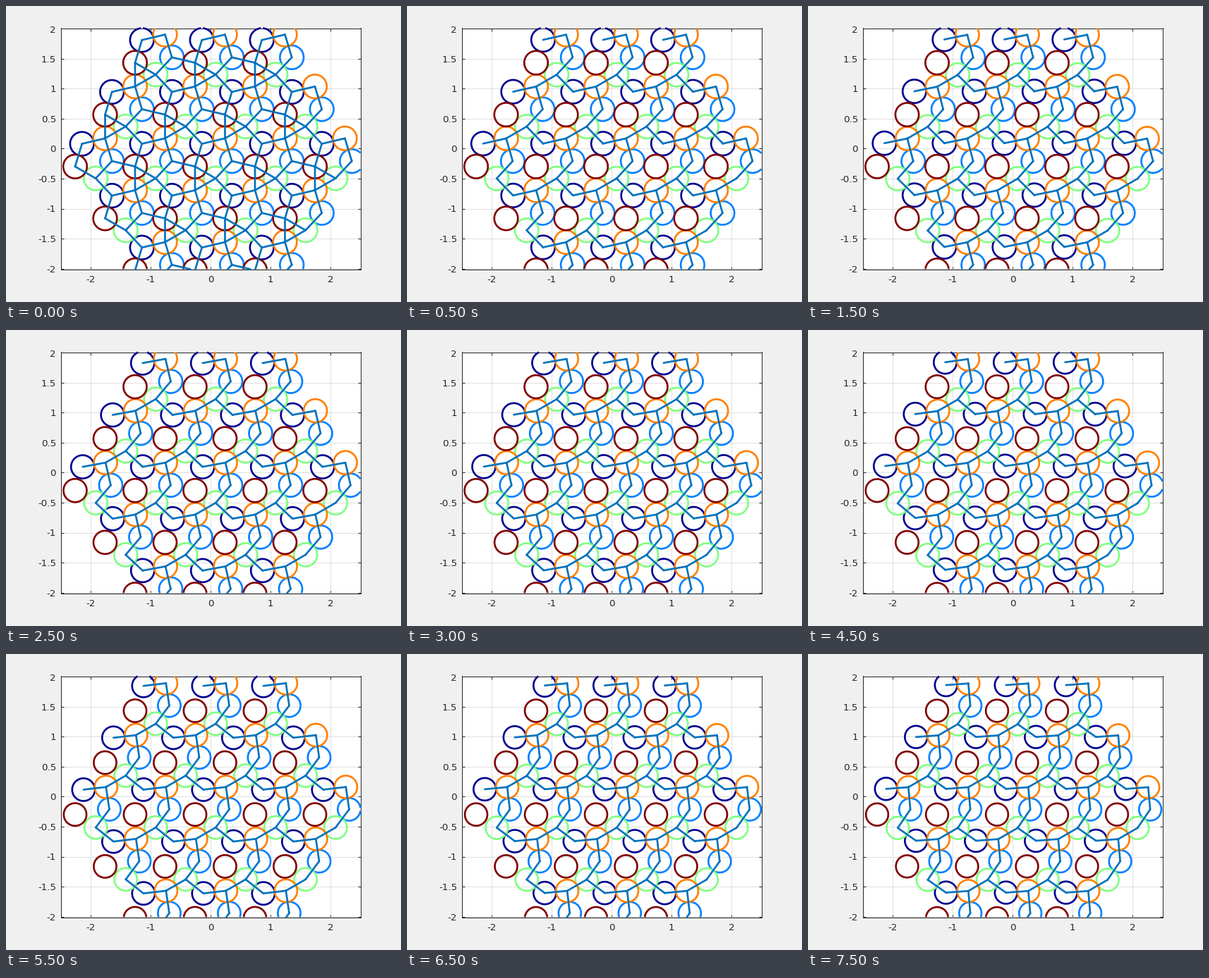
A matplotlib script for the animation above (8000 ms loop, 560x420 px).

```python
import numpy as np
import matplotlib.pyplot as plt
from matplotlib.animation import FuncAnimation

W, H, DPI = 560, 420, 100
PX = 72 / DPI            # one pixel in points
SCALE = 85               # pixels per data unit
LEFT, TOP, BOX_W, BOX_H = 77.5, 31.5, 425, 342
XMAX, YMAX = BOX_W / SCALE / 2, BOX_H / SCALE / 2
FRAMES, INTERVAL = 16, 500
LINE_W = 2.67 * PX
INK = "#262626"

A1 = np.array([1, 0])
A2 = np.array([0.5, np.sqrt(3) / 2])
RED = np.array([-0.259, -0.297])     # the disk that stays put

# 19 cells in a hexagon, row by row
CELLS = [i * A1 + j * A2 for j in range(-2, 3) for i in range(-2, 3) if abs(i + j) <= 2]

NAVY, SKY, GREEN, ORANGE, MAROON = range(5)
COLORS = ["#00008f", "#0080ff", "#80ff80", "#ff8000", "#800000"]

# (disk, disk, lattice shift of the second one)
BONDS = [
    (NAVY, ORANGE, 0 * A1), (ORANGE, SKY, 0 * A1), (SKY, GREEN, 0 * A1),
    (GREEN, NAVY, A1 - A2), (GREEN, ORANGE, -A2),
]
RED_BONDS = [
    (GREEN, MAROON, 0 * A1), (MAROON, NAVY, 0 * A1),
    (SKY, MAROON, A1), (MAROON, ORANGE, -A2),
]


def polar(r, deg):
    a = np.radians(deg)
    return r * np.array([np.cos(a), np.sin(a)])


def basis(near, alpha, far, beta):
    """Disk centres, mirror-symmetric about the -60 degree axis through RED."""
    return RED + np.array([
        polar(far, 120 - beta),
        polar(far, 120 + beta) + A1,
        polar(near, -60 + alpha),
        polar(near, -60 - alpha) + A2,
        (0, 0),
    ])


START, END = basis(0.3961, 30, 0.3961, 46.8), basis(0.411, 27, 0.4534, 49.25)
D_START, D_END = 0.3961, 0.373

TURN = np.linspace(0, 2 * np.pi, 241)
UNIT = np.column_stack([np.cos(TURN), np.sin(TURN)])
STEPS = np.linspace(0, 1, 80)[:, None]
GAP = np.full((1, 2), np.nan)


def join(paths):
    """Merge paths into one broken line, cut at the axes limits."""
    pts = np.vstack([part for path in paths for part in (path, GAP)])
    outside = (np.abs(pts[:, 0]) > XMAX) | (np.abs(pts[:, 1]) > YMAX)
    pts[outside] = np.nan
    return pts.T


fig = plt.figure(figsize=(W / DPI, H / DPI), dpi=DPI, facecolor="#f0f0f0")
ax = fig.add_axes([LEFT / W, 1 - (TOP + BOX_H) / H, BOX_W / W, BOX_H / H])
ax.set(xlim=(-XMAX, XMAX), ylim=(-YMAX, YMAX),
       xticks=np.arange(-2, 3), yticks=np.arange(-2, 2.1, 0.5))
ax.set_axisbelow(True)
ax.grid(color="#dfdfdf", lw=PX)
ax.tick_params(direction="in", top=True, right=True, length=4.3 * PX, width=PX,
               color=INK, labelcolor=INK, labelsize=13.33 * PX,
               labelfontfamily="DejaVu Sans")
ax.tick_params(axis="x", pad=8.4 * PX)
ax.tick_params(axis="y", pad=6.5 * PX)
for axis in (ax.xaxis, ax.yaxis):
    axis.set_major_formatter(lambda v, pos: f"{v:g}")
for spine in ax.spines.values():
    spine.set(color=INK, linewidth=PX, zorder=1.5)


def stroke(color, z, cap):
    return ax.plot([], [], color=color, lw=LINE_W, zorder=z, clip_on=False,
                   solid_capstyle=cap, solid_joinstyle="round")[0]


rings = [stroke(c, 3, "butt") for c in COLORS]
net = stroke("#0072bd", 4, "round")


def draw(k):
    s = k / (FRAMES - 1)
    disks = START + (END - START) * s
    radius = (D_START + (D_END - D_START) * s) / 2
    for ring, centre in zip(rings, disks):
        ring.set_data(*join([c + centre + radius * UNIT for c in CELLS]))
    # the fixed disk touches its neighbours only before they move off
    bonds = BONDS + (RED_BONDS if k == 0 else [])
    segments = []
    for c in CELLS:
        for a, b, shift in bonds:
            p, q = c + disks[a], c + disks[b] + shift
            # skip bonds to cells outside the cluster
            if any(np.allclose(c + shift, other) for other in CELLS):
                segments.append(p + (q - p) * STEPS)
    net.set_data(*join(segments))
    return [*rings, net]


anim = FuncAnimation(fig, draw, frames=FRAMES, interval=INTERVAL, repeat=True,
                     repeat_delay=0, blit=False)
plt.show()
```
